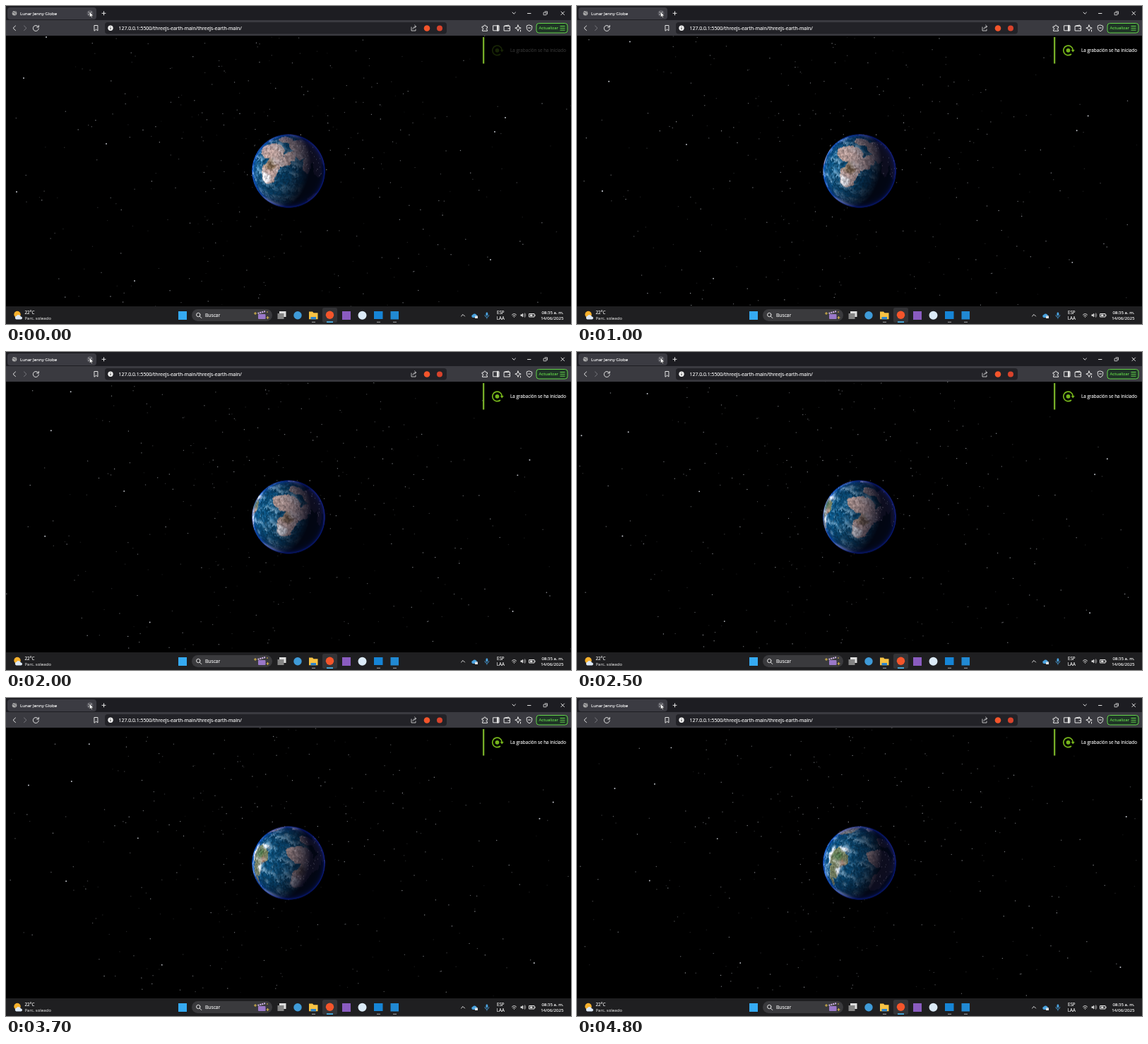
Recreate the animation shown at these times as an HTML page with a canvas. Size 800 by 450 pixels, loop 4900 ms.

```html
<!DOCTYPE html>
<html lang="es">
<head>
<meta charset="utf-8">
<title>Globe</title>
<style>
html, body { margin: 0; width: 100%; height: 100%; overflow: hidden; background: #000; }
canvas, svg { position: absolute; left: 0; top: 0; width: 800px; height: 450px; }
svg { color: #fff; }
text { font-family: "Open Sans", "Noto Sans", sans-serif; fill: currentColor; stroke: currentColor; stroke-width: .12; }
.line { fill: none; stroke: #e4e4e4; stroke-linecap: round; stroke-linejoin: round; }
</style>
</head>
<body>
<canvas id="space" width="800" height="450"></canvas>
<svg viewBox="0 0 800 450">
  <!-- window frame -->
  <rect width="800" height="20.5" fill="#1d1d22"/>
  <rect y="20" width="800" height="22" fill="#3a3a40"/>
  <rect x="2" y="2" width="126" height="17" rx="4" fill="#3b3b42"/>
  <circle cx="12" cy="10.3" r="3.3" fill="#aaa"/>
  <path d="M9.500 9l3 1 1 2M12 7l2 2" class="line" stroke-width=".7" style="stroke:#3b3b42"/>
  <text x="20" y="12.500" font-size="6.1">Lunar Jenny Globe</text>
  <circle cx="119" cy="10.3" r="4.5" fill="#56565d"/>
  <path d="M117 8.300l4 4m0-4l-4 4" class="line"/>
  <path d="M118.500 8.500v7.200l1.700-1.500 1 2.200 1.100-.5-1-2.100h2.300z" fill="#fff" stroke="#111" stroke-width=".4"/>
  <g class="line">
    <path d="M136 10.300h5m-2.500-2.500v5M717 9l2.200 2.200L721.400 9M738.500 10.500h4.500M786 8l4.500 4.500m0-4.500L786 12.500"/>
    <path d="M761.500 9.200h3.500v3.500h-3.500zM763 7.800h3.500v3.500" stroke-width=".8"/>
    <path d="M13.500 28l-3.500 3.300 3.500 3.300"/>
    <path d="M25.500 28l3.500 3.300-3.500 3.300" style="stroke:#77777d"/>
    <path d="M45.800 29.500a4 4 0 1 0 .5 2.500M46.300 27.500v2.500h-2.600M125.300 27.500h4.600v7.500l-2.300-1.900-2.300 1.900z"/>
  </g>
  <rect x="140" y="23" width="484" height="16.5" rx="4" fill="#222227"/>
  <circle cx="148" cy="31.2" r="3.7" fill="#eee"/>
  <path d="M148 30.800v2.300M148 29.200v.6" stroke="#222"/>
  <text x="159.500" y="33.700" font-size="6.9">127.0.0.1:5500/threejs-earth-main/threejs-earth-main/</text>
  <path d="M574 30v5h6v-2M576 32.500q.5-3.500 4.500-3.500M578.500 27l2.200 2-2.200 2" class="line" stroke-width=".8"/>
  <circle cx="596" cy="31.5" r="4.3" fill="#f4552b"/>
  <circle cx="614" cy="31.5" r="4" fill="#d8432c"/>
  <g class="line">
    <path d="M674.500 29h2q0-2 1.500-2t1.500 2h2v2.300q-1.500 0-1.500 1.200t1.500 1.200v1.600h-7v-1.800q1.500 0 1.500-1.200t-1.500-1.200z"/>
    <rect x="690" y="27.8" width="8" height="7"/><path d="M696.200 28v6.500" stroke-width="2.5"/>
    <path d="M705.500 28.500h8v6.500h-8zM706 28l6-1v1M711 31.800h2"/>
    <path d="M725 27l1.200 3 3 1.200-3 1.200-1.200 3-1.200-3-3-1.200 3-1.200zM728.500 34v2"/>
    <path d="M741 27l3.700 1.300v3q0 3-3.700 4.500-3.700-1.500-3.700-4.500v-3zM739.500 31h3"/>
  </g>
  <g color="#63d34a" stroke="currentColor">
    <rect x="751" y="24.5" width="44" height="13.5" rx="3.5" fill="#1f3426"/>
    <text x="754.500" y="33.400" font-size="6">Actualizar</text>
    <path d="M784.500 28.500h7m-7 2.800h7m-7 2.800h7"/>
  </g>

  <!-- notice -->
  <rect x="677" y="44" width="123" height="37.5"/>
  <rect x="675" y="44" width="2.3" height="37.5" fill="#76ad28"/>
  <g id="notice">
    <path d="M700 68a6.800 6.800 0 1 1 2.300-5.500" fill="none" stroke="#76b51b" stroke-width="1.7"/>
    <path d="M699.700 62h5l-2.500 3.400z" fill="#76b51b"/>
    <circle cx="695.5" cy="62.8" r="2.9" fill="#76b51b"/>
    <text x="714" y="65.200" font-size="6.3">La grabación se ha iniciado</text>
  </g>

  <!-- taskbar -->
  <rect y="425" width="800" height="25" fill="#1f1f21"/>
  <circle cx="16" cy="436.5" r="4.7" fill="#f7b12c"/>
  <path d="M14.500 443.500a2.600 2.600 0 0 1 .5-5 3.400 3.400 0 0 1 6 1 2 2 0 0 1 0 4z" fill="#dce8f5"/>
  <text x="26.500" y="435.600" font-size="6.3">22°C</text>
  <text x="26.500" y="444" font-size="6" color="#c4c4c4">Parc. soleado</text>
  <rect x="244" y="432" width="12" height="12" fill="#35aaf2"/>
  <rect x="263" y="429" width="114" height="17" rx="8.5" fill="#3a3a3d"/>
  <path d="M275 437a2.700 2.700 0 1 0-5.400 0 2.700 2.700 0 1 0 5.400 0M274.400 439.200l2.400 2.400" class="line"/>
  <text x="282" y="440.200" font-size="6.7">Buscar</text>
  <rect x="357" y="436" width="10.5" height="7" rx="1" fill="#9a78c8"/>
  <path d="M356.500 435l10.500-3" stroke="#c8addf" stroke-width="2.3" stroke-dasharray="2 1"/>
  <path d="M353 433v4m-2-2h4M370.500 439v4m-2-2h4M370 432v2" stroke="#e9c34a" stroke-width=".9"/>
  <rect x="387" y="432" width="9.5" height="8" fill="#ddd"/><rect x="384.5" y="435" width="9" height="8" fill="#858585"/>
  <circle cx="413" cy="437.8" r="5.7" fill="#3f9bd8"/>
  <path d="M429 432.500h5l1.500 1.800h6v9H429z" fill="#f6c244"/><path d="M431.500 440h7.500v3.300h-7.500z" fill="#2c85d0"/>
  <rect x="448" y="427" width="21" height="21" rx="2.5" fill="#343437"/>
  <circle cx="458.5" cy="437.3" r="5.7" fill="#f4552b"/>
  <rect x="476" y="432" width="12" height="12" fill="#8a5cc0"/>
  <circle cx="504.5" cy="437.7" r="6" fill="#dbeaf7"/>
  <rect x="521" y="432" width="12.5" height="11" fill="#1685d6"/>
  <rect x="544.5" y="432" width="11.5" height="11.5" fill="#2189d3"/>
  <path d="M433 447.300h5M525 447.300h5M548 447.300h5" stroke="#8b8b8d" stroke-width="1.3"/>
  <path d="M454 447.200h9" stroke="#4cc2ff" stroke-width="1.6"/>
  <path d="M644.500 439l2.500-2.500 2.500 2.500" class="line"/>
  <path d="M661 441a2.200 2.200 0 0 1 0-4.300 3.200 3.200 0 0 1 5.500.8 1.900 1.900 0 0 1 0 3.500z" fill="#4aa3e0"/>
  <rect x="664" y="438.5" width="4" height="3.5" fill="#ddd"/>
  <rect x="679.5" y="433.5" width="2.8" height="5" rx="1.4" fill="#4aa3e0"/>
  <path d="M678 437.500q0 2.800 2.900 2.800t2.900-2.800M680.900 440.300v2" class="line" style="stroke:#4aa3e0" stroke-width=".8"/>
  <g text-anchor="middle" font-size="6.2"><text x="700.300" y="435.700">ESP</text><text x="700.300" y="444">LAA</text></g>
  <path d="M716.500 437q3-3 6 0M717.800 438.700q1.700-1.600 3.400 0M719.500 440.300v.2" class="line"/>
  <path d="M728.500 436.500h1.500l2-1.800v5.800l-2-1.800h-1.500z" fill="#ddd"/>
  <path d="M733.300 436q1.200 1.500 0 3.200M734.800 434.800q2 2.800 0 5.500" class="line" stroke-width=".7"/>
  <path d="M741 435.500h7v4.500h-7zM749 437v1.500" class="line"/><path d="M742 436.500h3.500v2.500h-3.500z" fill="#ddd"/>
  <g text-anchor="end" font-size="6.1"><text x="789.500" y="435.700">08:35 a. m.</text><text x="789.500" y="444">14/06/2025</text></g>
</svg>
<script>
const ctx = document.getElementById('space').getContext('2d');
const notice = document.getElementById('notice');
const CX = 400, CY = 233.5, FOCAL = 249.6, RADIUS = 51.6, TILT = 0.4084;
const RAD = Math.PI / 180, W = 720, H = 360;

let seed = 11;
const rand = () => (seed = (seed * 16807) % 2147483647) / 2147483647;
const clamp = (v, a = 0, b = 1) => Math.min(b, Math.max(a, v));
const mix = (a, b, k) => a + (b - a) * k;
const smooth = (a, b, v) => { v = clamp((v - a) / (b - a)); return v * v * (3 - 2 * v); };

// --- stars: a yaw angle and a height on a cylinder of radius FOCAL
const stars = [];
const addStar = (angle, rise, size, light) => stars.push({ angle, rise, size, light });
function addBright(x, y) {
  const angle = Math.atan((x - CX) / FOCAL);
  addStar(angle, (y - CY) * Math.cos(angle), 0.85, 0.85);
}
addBright(25, 102);
addBright(57, 44);
addBright(-56, 105);
addBright(142, 195);
addBright(15, 263);
addBright(182, 389);
addBright(707, 158);
addBright(692, 178);
addBright(686, 359);
for (let i = 0; i < 520; i++) {
  const y = mix(-0.7, 0.7, rand());
  addStar(mix(-1.25, 1.05, rand()), FOCAL * y / Math.sqrt(1 - y * y), 0.65, 0.08 + 0.6 * rand() ** 1.3);
}

function drawStars(t) {
  for (const s of stars) {
    const angle = s.angle + 0.0257 * t, depth = Math.cos(angle);
    ctx.fillStyle = `rgba(222,226,234,${s.light})`;
    ctx.beginPath();
    ctx.arc(CX + FOCAL * Math.tan(angle), CY + s.rise / depth, s.size * (0.75 + 0.25 / depth), 0, 7);
    ctx.fill();
  }
}

// --- planet surface
const hash = (x, y, z) => {
  const h = Math.sin(x * 127.1 + y * 311.7 + z * 74.7) * 43758.5453;
  return h - Math.floor(h);
};
function noise(x, y, z) {
  const i = Math.floor(x), j = Math.floor(y), k = Math.floor(z);
  const u = smooth(0, 1, x - i), v = smooth(0, 1, y - j), w = smooth(0, 1, z - k);
  const row = (b, c) => mix(hash(i, b, c), hash(i + 1, b, c), u);
  return mix(mix(row(j, k), row(j + 1, k), v), mix(row(j, k + 1), row(j + 1, k + 1), v), w);
}
function fbm(x, y, z) {
  let sum = 0, amp = 0.5;
  for (let o = 0; o < 4; o++, amp /= 2) {
    sum += amp * noise(x, y, z);
    x = x * 2.1 + 5; y = y * 2.1 + 3; z = z * 2.1 + 7;
  }
  return sum;
}

// Continents are rough ellipses (centre and radii in degrees).
function paintLand() {
  const map = document.createElement('canvas');
  map.width = W; map.height = H;
  const m = map.getContext('2d');
  const blob = (color, lon, lat, rx, ry, blur = 0) => {
    m.filter = `blur(${blur}px)`;
    m.fillStyle = color;
    m.beginPath();
    m.ellipse((lon + 180) * W / 360, (90 - lat) * H / 180, rx * W / 360, ry * H / 180, 0, 0, 7);
    m.fill();
  };
  const sand = '#b59a90', steppe = '#a18e88', forest = '#66704c', ice = '#dde4ea';
  m.fillStyle = '#08466c';
  m.fillRect(0, 0, W, H);
  blob(sand, 10, 20, 26, 15);          // Africa
  blob(sand, 38, 10, 11, 8);
  blob(sand, 25, -12, 14, 23);
  blob(sand, 46, 23, 10, 10);          // Arabia
  blob(steppe, 15, 51, 20, 9);         // Europe and Asia
  blob(steppe, 90, 50, 60, 22);
  blob(steppe, 60, 32, 14, 8);
  blob(steppe, 79, 20, 8, 12);
  blob(steppe, 105, 22, 12, 13);
  blob('#a08268', 134, -25, 19, 12);   // Australia
  blob(forest, -60, -6, 19, 14);       // South America
  blob(forest, -61, -27, 11, 13);
  blob(forest, -69, -44, 5, 12);
  blob('#7d7c6c', -100, 50, 34, 20);   // North America
  blob(ice, -42, 73, 14, 9);
  blob('#6d5538', 22, -1, 9, 7, 4);
  blob('#e2e2e2', 21, -25, 8, 9, 4);
  blob('#3f6236', -62, -3, 9, 6, 4);
  blob('#8a5f45', -49, -12, 5, 6, 4);
  blob(ice, -77, -8, 3, 16, 3);
  blob(ice, -55, 9, 13, 3, 3);
  blob(ice, -52, -26, 4, 8, 4);
  return m.getImageData(0, 0, W, H).data;
}

function makeSurface() {
  const land = paintLand();
  const day = new Uint8ClampedArray(W * H * 3), night = new Uint8ClampedArray(W * H * 3);
  const haze = [150, 192, 218], snow = [215, 222, 228];
  for (let j = 0; j < H; j++) for (let i = 0; i < W; i++) {
    const lat = (0.5 - (j + 0.5) / H) * Math.PI, lon = (i / W - 0.5) * 2 * Math.PI;
    const x = Math.cos(lat) * Math.cos(lon), y = Math.sin(lat), z = Math.cos(lat) * Math.sin(lon);
    // ragged coasts: look the land up at a place shifted by noise
    const bend = s => Math.round(26 * (fbm(x * 7 + s, y * 7, z * 7) - 0.47));
    const p = (clamp(j + bend(20), 0, H - 1) * W + (i + bend(60) + W) % W) * 4;
    const isLand = land[p] > 45;
    const grain = fbm(x * 26, y * 26, z * 26);
    const streak = fbm(x * 5 + 9, y * 9 + 2 * grain, z * 5 + 4);
    const cloud = smooth(0.4, 0.72, streak * 0.75 + grain * 0.25) * (isLand ? 0.4 : 0.75);
    const shade = 0.45 + grain * 1.1, polar = smooth(0.88, 0.97, Math.abs(y)) * 0.7;
    const city = isLand && lat > -0.3 && hash(i, j, 3) > 0.97 ? 50 : 0;
    for (let c = 0; c < 3; c++) {
      const q = (j * W + i) * 3 + c;
      const ground = mix(land[p + c] * shade, (isLand ? snow : haze)[c], cloud);
      day[q] = mix(ground, snow[c], polar);
      night[q] = (isLand ? [13, 13, 30] : [2, 6, 18])[c] + city;
    }
  }
  return { day, night };
}

const surface = makeSurface();
const SIZE = 108;
const globe = document.createElement('canvas');
globe.width = globe.height = SIZE;
const gctx = globe.getContext('2d');
const image = gctx.createImageData(SIZE, SIZE);
const sinT = Math.sin(TILT), cosT = Math.cos(TILT);

function drawGlobe(t) {
  const center = 53 - 15.6 * t, out = image.data, rim = [12, 40, 215];
  for (let j = 0; j < SIZE; j++) for (let i = 0; i < SIZE; i++) {
    let x = (i + 0.5 - SIZE / 2) / RADIUS, y = (SIZE / 2 - j - 0.5) / RADIUS;
    const r = Math.hypot(x, y), p = (j * SIZE + i) * 4;
    out[p + 3] = 255 * clamp((1 - r) * RADIUS + 0.5);
    if (!out[p + 3]) continue;
    if (r > 0.999) { x *= 0.999 / r; y *= 0.999 / r; }
    const z = Math.sqrt(1 - x * x - y * y);
    const lat = Math.asin(y * cosT + x * sinT) / RAD;
    const lon = center + Math.atan2(x * cosT - y * sinT, z) / RAD;
    const u = Math.floor(((lon + 540) % 360) * W / 360);
    const v = clamp(Math.floor((90 - lat) * H / 180), 0, H - 1);
    const k = (v * W + u) * 3;
    const sun = Math.max(0, -0.784 * x + 0.196 * y + 0.588 * z);
    const edge = Math.pow(1 - z, 5);
    for (let c = 0; c < 3; c++)
      out[p + c] = surface.day[k + c] * sun * 1.15 + surface.night[k + c] * (1 - sun * 0.8) + rim[c] * edge;
  }
  gctx.putImageData(image, 0, 0);
  ctx.drawImage(globe, CX - SIZE / 2, CY - SIZE / 2);
}

function frame() {
  const t = Math.floor(performance.now() % 4900 / 100) / 10;
  ctx.fillStyle = '#000';
  ctx.fillRect(0, 0, 800, 450);
  drawStars(t);
  drawGlobe(t);
  notice.setAttribute('opacity', Math.min(1, 0.2 + t * 2.7));
  requestAnimationFrame(frame);
}
frame();
</script>
</body>
</html>
```
